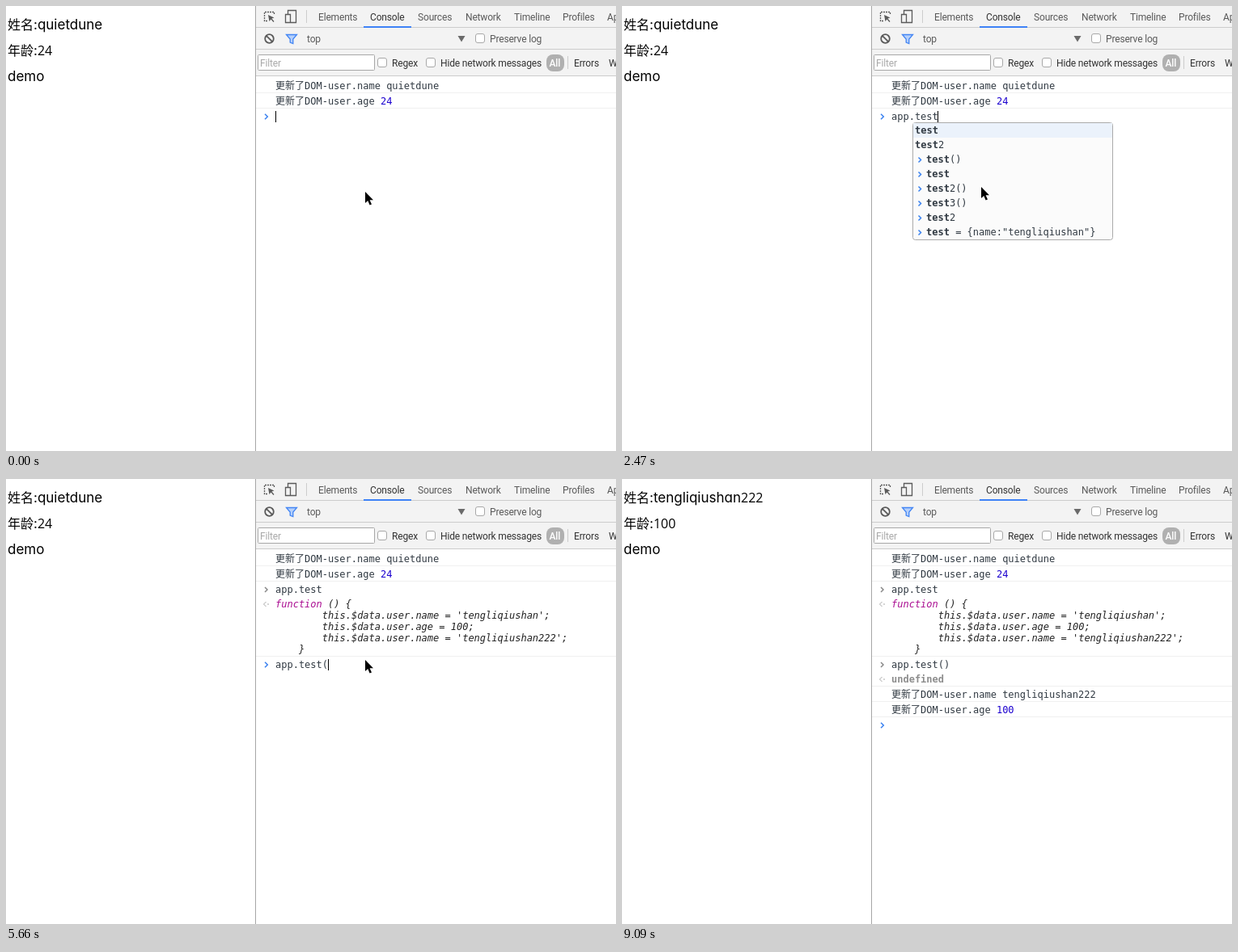
An HTML page for the animation above (9260 ms loop, 754x551 px).

```html
<!DOCTYPE html>
<html lang="zh">
<head>
<meta charset="utf-8">
<title>Console demo</title>
<style>
html, body { margin: 0; width: 100%; height: 100%; overflow: hidden; background: #fff; }
svg { display: block; }
text { white-space: pre; }
.page { font: 16px Inter, "Noto Sans CJK SC", "Noto Sans CJK", sans-serif; fill: #000; }
.latin { font-size: 17px; font-feature-settings: "cv11"; }
.digits { font: 16px "Open Sans", sans-serif; }
.ui { font: 12px Roboto, sans-serif; letter-spacing: -.17px; fill: #5a5a5a; }
.dark { fill: #333; }
.code { font: 12px "DejaVu Sans Mono", "Noto Sans CJK SC", "Noto Sans CJK", monospace; fill: #303942; }
.bold { font-weight: bold; }
.em { font-style: italic; fill: #222; }
.key { fill: #aa0d91; }
.num { fill: #1c00cf; }
.dim { fill: #8c8c8c; }
.icon { fill: none; stroke: #5a5a5a; stroke-width: 1.3; }
.box { fill: #fff; stroke: #a8a8a8; }
</style>
</head>
<body>
<svg width="754" height="551" viewBox="0 0 754 551">
  <g id="page"></g>
  <rect x="309" width="445" height="86" fill="#f3f3f3"/>
  <path d="M309 26.5H754M309 53.5H754M309 86.5H754M371.5 5V21M694.5 62V78" stroke="#ccc"/>
  <path d="M308.5 0V551" stroke="#a6a6a6"/>
  <rect x="442" y="25" width="59" height="2" fill="#3e82f7"/>
  <g class="icon">
    <path d="M323 18.5H319.5V7.5H331.5V10" stroke-dasharray="2 1"/>
    <path d="M324 11L331.500 14.500L328.500 15.500L331.500 19L330.500 20L327.500 16.500L325.500 19Z" fill="#5a5a5a" stroke="none"/>
    <path d="M348.500 10V5.500H358.500V20.500H352M345.500 10.500H351.500V20.500H345.500Z"/>
    <g stroke-width="1.8"><circle cx="325.500" cy="40.500" r="5.300"/><path d="M321.800 36.800L329.200 44.200"/></g>
    <path d="M346.500 35.500H359.500L354.800 41V46.500L351.200 45V41Z" fill="#b5d0fb" stroke="#4285f4"/>
  </g>
  <path d="M558.500 37H567.500L563 44.500Z" fill="#6a6a6a"/>
  <rect class="box" x="311.500" y="60.500" width="144" height="19" rx="1"/>
  <rect x="668" y="60" width="22" height="21" rx="8" fill="#b0b0b0"/>
  <g id="chrome"></g>
  <g id="console"></g>
  <path id="cursor" d="M0 0V14L3.200 11L5.600 16.500L8 15.500L5.600 10.200H10Z" stroke="#fff" stroke-width="1.800" paint-order="stroke"/>
</svg>
<script>
const LOOP = 9260, CHAR = 7.224, BOTTOM = 551;
const OLD = 'quietdune', NEW = 'tengliqiushan', NEW2 = NEW + '222';
const $ = id => document.getElementById(id);
const span = (cls, s) => `<tspan class="${cls}">${s}</tspan>`;
const text = (x, y, s, cls = 'code') => `<text x="${x}" y="${y}" class="${cls}">${s}</text>`;
const rect = (x, y, w, h, attrs) => `<rect x="${x}" y="${y}" width="${w}" height="${h}" ${attrs}/>`;
const chevron = (x, y, r = 3.3, color = '#3b82f0') =>
  `<path d="M${x} ${y - r}l${r} ${r}l${-r} ${r}" fill="none" stroke="${color}" stroke-width="1.5"/>`;
const rule = y => rect(309, y, 445, 1, 'fill="#f0f0f0"');

const checkbox = (x, y) => rect(x + .5, y + .5, 11, 11, 'rx="2.5" class="box"');
const labels = [
  [386, 18, 'Elements'], [450, 18, 'Console', 1], [509, 18, 'Sources'], [568, 18, 'Network'],
  [628, 18, 'Timeline'], [688, 18, 'Profiles'], [743, 18, 'Application'],
  [372, 45, 'top'], [598, 45, 'Preserve log'],
  [477, 75, 'Regex', 1], [537, 75, 'Hide network messages', 1], [702, 75, 'Errors', 1], [745, 75, 'Warnings', 1]
];
$('chrome').innerHTML = labels.map(([x, y, s, dark]) => text(x, y, s, dark ? 'ui dark' : 'ui')).join('') +
  `<text x="314" y="75" class="ui" style="fill:#a9a9a9">Filter</text>` +
  `<text x="671.5" y="75" class="ui" style="fill:#fff;font-weight:500">All</text>` +
  checkbox(580, 34) + checkbox(459, 64) + checkbox(519, 64);

const globals = ['app', 'applicationCache'];
const props = ('$data $el $mount $options $watch __defineGetter__ __defineSetter__ __lookupGetter__ __lookupSetter__ ' +
  '_bindDirective _compile _compileElement _compileNode _compileTextNode _createBindingAt _directives _init ' +
  '_initBindings _initDOM _initData _updateBindingAt _watchers constructor test test2 toLocaleString toString').split(' ');
const history = ['app.test()', 'app.test', 'app.test2()', 'app', 'app.$data.age = 100', `app.$data.name = "${NEW}"`,
  "app.$data.address.info.city = 'aaa'", 'app.$data.user', `app.$data.user.name = "${NEW}"`, 'app.test3()', 'app.test2',
  'app._directives[0].update()', 'app._directives[0].update', "app._directives[0].el.nodeValue = 'jskdfj'",
  'app._directives[0].el.tagName', 'app._directives[0].el.nodeType', 'app._directives[0].el', 'app._directives[0]',
  'app._directives[3]', 'app._directives', 'app._watchers', `app.test = {name:"${NEW}"}`];
const laterHistory = ['app.test', ...history.filter(s => s !== 'app.test')];

// [time, typed text, query of the open popup]
const steps = [
  [0, '', ''], [920, 'a', ''], [1000, 'a', 'a'], [1270, 'ap', 'a'], [1300, 'ap', 'ap'], [1390, 'app', 'ap'],
  [1420, 'app', 'app'], [1720, 'app.', ''], [1740, 'app.', 'app.'], [1980, 'app.t', 'app.'], [2010, 'app.t', 'app.t'],
  [2160, 'app.te', 'app.t'], [2190, 'app.te', 'app.te'], [2300, 'app.tes', 'app.tes'], [2470, 'app.test', 'app.test'],
  [2770, 'app.test', ''], [2800, '', ''],
  [3450, 'a', ''], [3480, 'a', 'a'], [3600, 'ap', 'a'], [3630, 'ap', 'ap'], [3780, 'app', 'ap'], [3800, 'app', 'app'],
  [4250, 'app.', 'app.'], [4450, 'app.t', 'app.'], [4480, 'app.t', 'app.t'], [4600, 'app.te', 'app.t'],
  [4630, 'app.te', 'app.te'], [4710, 'app.tes', 'app.tes'], [4860, 'app.test', 'app.tes'], [4890, 'app.test', 'app.test'],
  [5660, 'app.test(', ''], [5870, 'app.test()', ''], [6610, '', '']
];
const caretOff = [[350, 470], [3280, 3450], [5360, 5660], [6380, 6610], [7180, 7690], [8190, 8640], [9090, LOOP]];

function matches(query, past) {
  const dot = query.indexOf('.') + 1, prefix = query.slice(dot);
  const items = (dot ? props : globals).filter(s => s.startsWith(prefix)).map(s => ({ s }));
  if (prefix) past.filter(s => s.startsWith(query)).forEach(s => items.push({ s: s.slice(dot), old: true }));
  return { dot, prefix, items };
}

function popup({ dot, prefix, items }, top) {
  const x = dot ? 359 : 330, w = !dot ? 440 : prefix ? 248 : 169, h = items.length * 18 + 2;
  let out = rect(x + .5, top + .5, w - 1, h - 1, 'rx="3" fill="#fbfbfb" stroke="#aaa"') +
    rect(x + 1, top + 1, w - 2, 18, 'fill="#ebf2fb"');
  items.forEach(({ s, old }, i) => {
    const mid = top + 10 + i * 18;
    if (old) out += chevron(x + 7.5, mid + .5, 3);
    out += text(x + (old ? 17 : 3), mid + 4, span('bold', prefix) + s.slice(prefix.length));
  });
  if (!dot) out += rect(745, top + 1, 9, BOTTOM, 'fill="#f6f6f6"') + rect(748, top + 4, 8, BOTTOM, 'rx="3" fill="#c1c1c1"');
  return out;
}

const log = (mid, prop, value) => text(333, mid + 4, `更新了DOM-user.${prop} ${value}`);
const command = (mid, s) => chevron(320, mid, 3, '#8a8a8a') + text(333, mid + 4, s);
const resultMark = mid => `<path d="M321.500 ${mid - 3}l-3 3l3 3M323 ${mid}h2" fill="none" stroke="#aaa"/>`;

function body() {
  const lines = [[0, span('key', 'function') + ' () {'], [8, `this.$data.user.name = '${NEW}';`],
    [8, 'this.$data.user.age = 100;'], [8, `this.$data.user.name = '${NEW2}';`], [4, '}']];
  return resultMark(155) + lines.map(([indent, s], i) => text(333 + indent * CHAR, 159 + i * 14, s, 'code em')).join('');
}

function prompt(mid, typed, query, caret, past) {
  const found = query && matches(query, past);
  const guess = found ? query.slice(0, found.dot) + found.items[0].s : '';
  const rest = guess.startsWith(typed) ? guess.slice(typed.length) : '';
  return chevron(320, mid, 3.3) + text(333, mid + 4, typed + span('dim', rest)) +
    (caret ? rect(Math.floor(333 + typed.length * CHAR), mid - 7, 1, 14, 'fill="#000"') : '') +
    (found ? popup(found, mid + 7) : '');
}

function drawConsole(stage, typed, query, caret) {
  let out = log(99, 'name', OLD) + rule(107) + log(118, 'age', span('num', 24)) + rule(126);
  if (stage > 0) out += command(137, 'app.test') + body() + rule(219);
  if (stage > 1) out += command(230, 'app.test()') + resultMark(248) + text(333, 252, 'undefined', 'code bold dim') +
    rule(256) + log(267, 'name', NEW2) + rule(275) + log(286, 'age', span('num', 100)) + rule(294);
  return out + prompt([137, 230, 305][stage], typed, query, caret, stage ? laterHistory : history);
}

function drawPage(updated) {
  const name = updated ? NEW + span('digits', 222) : OLD;
  return text(2, 29, '姓名' + span('latin', ':' + name), 'page') +
    text(2, 61, '年龄' + span('latin', ':' + span('digits', updated ? 100 : 24)), 'page') +
    text(2, 93, span('latin', 'demo'), 'page');
}

function cursorAt(t) {
  if (t < 120) return [444, t < 30 ? 230 : t < 70 ? 228 : 226];
  const k = Math.min(1, Math.max(0, (t - 7980) / 900)), e = k * k * (3 - 2 * k);
  return [444 + 292 * e, 224 + 330 * e];
}

let shown = '';
function frame(now) {
  const t = now % LOOP;
  const [, typed, query] = steps.findLast(s => s[0] <= t);
  const caret = !caretOff.some(([a, b]) => t >= a && t < b);
  const stage = t < 2800 ? 0 : t < 6610 ? 1 : 2, updated = t >= 6640;
  const key = [stage, updated, typed, query, caret].join('|');
  if (key !== shown) {
    shown = key;
    $('page').innerHTML = drawPage(updated);
    $('console').innerHTML = drawConsole(stage, typed, query, caret);
  }
  $('cursor').setAttribute('transform', `translate(${cursorAt(t)})`);
  requestAnimationFrame(frame);
}
const start = performance.now();
const tick = () => frame(Math.max(0, performance.now() - start));
function loop() { tick(); }
frame = (draw => () => draw(Math.max(0, performance.now() - start)))(frame);
loop();
</script>
</body>
</html>
```
